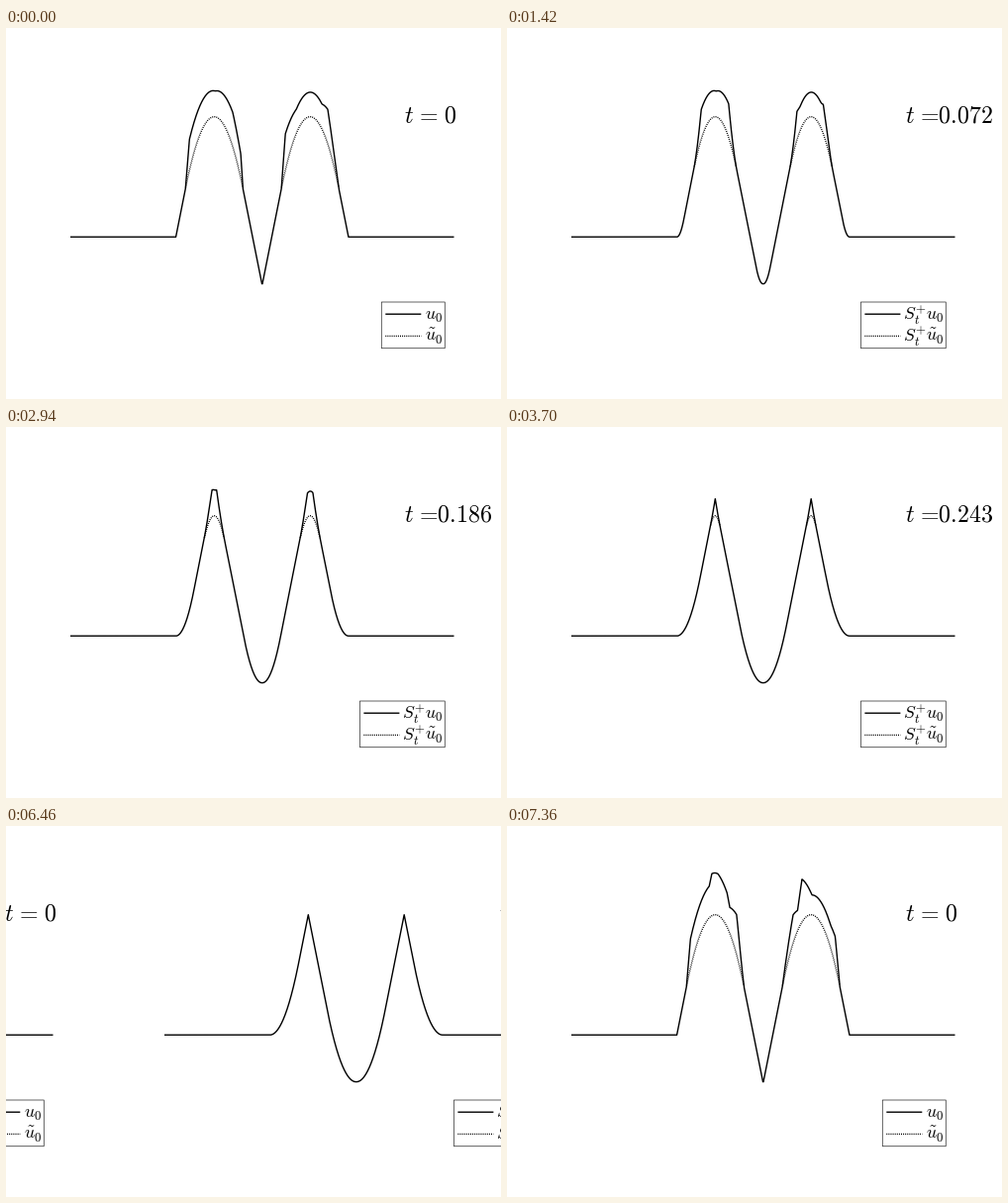
A matplotlib script for the animation above (8000 ms loop, 500 by 375 pixels).

```python
import numpy as np
import matplotlib.pyplot as plt
from matplotlib.animation import FuncAnimation
from matplotlib.patches import Rectangle
from matplotlib.transforms import Affine2D

W, H, DPI = 500, 375, 100
PT = 72 / DPI                       # points per pixel
TICK, LOOP = 20, 8000
EVOLVE, SLIDE, ARRIVE = 500, 6460, 7360
STEPS, DT = 100, 0.003
HORIZON = STEPS * DT

X0, X_SCALE = 258.75, 96.875
Y0, Y_SCALE = 211.2, 486

plt.rcParams["mathtext.fontset"] = "cm"

x = np.linspace(-1, 1, 801)
PLOT_X = X0 + X_SCALE * np.concatenate([[-2], x, [2]])
COST = (x[:, None] - x[None, :]) ** 2 / 2


def smooth_profile():
    """Unit-slope flanks joined by parabolic caps centred at +-0.5."""
    a = np.abs(x)
    cap = 0.25 - (a - 0.5) ** 2 / (2 * HORIZON)
    u = np.where(np.abs(a - 0.5) < HORIZON, cap,
                 np.where(a < 0.5, a - 0.1, np.maximum(0.9 - a, 0)))
    return np.maximum(u, -0.0975)


def lift(center, *knots):
    """Broken line added to a cap; knots are (offset, height) in pixels."""
    edge = HORIZON * X_SCALE
    dx, dy = np.array([(-edge, 0), *knots, (edge, 0)]).T
    return np.interp((x - center) * X_SCALE, dx, dy) / Y_SCALE


def hopf_lax(u, t):
    return u if t == 0 else (COST / t + u).min(axis=1)


def evolve(u, steps):
    """Screen heights of the solution at each time step."""
    states = (hopf_lax(u, k * DT) for k in range(steps + 1))
    return [Y0 - Y_SCALE * np.pad(state, 1) for state in states]


smooth = smooth_profile()
rounded = (smooth
           + lift(-0.5, (-25, 31.2), (1, 26), (18.7, 34.6), (26.8, 24.5))
           + lift(0.5, (-25, 36.7), (-14, 24.3), (12, 25.2), (17.8, 34.8),
                  (23.8, 14)))
jagged = (smooth
          + lift(-0.5, (-25, 29.5), (-6, 32), (-3.4, 42.5), (2.7, 42),
                 (12, 34.4), (14.6, 25.8), (21.6, 40.4), (26.7, 10))
          + lift(0.5, (-18.2, 28.5), (-13.7, 20.5), (-9.2, 43.2), (0.8, 20),
                 (19.8, 23), (24.3, 29)))

smooth_states = evolve(smooth, STEPS)
rounded_states = evolve(rounded, STEPS)
jagged_states = evolve(jagged, 0)

fig = plt.figure(figsize=(W / DPI, H / DPI), dpi=DPI, facecolor="white")
ax = fig.add_axes([0, 0, 1, 1])
ax.set(xlim=(0, W), ylim=(H, 0))
ax.set_axis_off()

SOLID = dict(color="black", lw=1.4 * PT, ls="-", solid_joinstyle="round",
             solid_capstyle="butt", snap=False)
DOTTED = dict(color="black", lw=1.4 * PT, ls=(0, (0.7, 0.8)),
              dash_capstyle="butt", snap=False)
FONT, SMALL = 17.8, 12.8


class Panel:
    """One plot with its time label and legend, movable sideways."""

    def __init__(self, states):
        self.states = states
        self.shift = Affine2D()
        self.place = dict(transform=self.shift + ax.transData)
        self.dotted = self.line(DOTTED)
        self.solid = self.line(SOLID)
        self.time = self.text(402.5, 95, "", 24)
        self.box = ax.add_patch(Rectangle(
            (0, 277), 1, 46.7, fc="white", ec="#262626", lw=0.7 * PT,
            snap=False, **self.place))
        self.keys = [self.line(SOLID), self.line(DOTTED)]
        self.names, self.operators = [], []
        for base, symbol in ((294.4, "u"), (316.2, r"\tilde{u}")):
            self.names += [self.text(422.7, base, symbol, FONT),
                           self.text(432.7, base + 2.7, "0", SMALL)]
            self.operators += [self.text(400, base, "S", FONT),
                               self.text(411, base + 4.4, "t", SMALL),
                               self.text(412, base - 6.5, "+", SMALL)]
        self.artists = [self.dotted, self.solid, self.time, self.box,
                        *self.keys, *self.names, *self.operators]

    def line(self, style):
        return ax.plot([], [], **style, **self.place)[0]

    def text(self, px, py, symbol, size):
        # Braces keep a lone "+" free of operator spacing.
        content = f"${{{symbol}}}$" if symbol else ""
        return ax.text(px, py, content, fontsize=size * PT, va="baseline",
                       ha="left", **self.place)

    def hide(self):
        for artist in self.artists:
            artist.set_visible(False)

    def show(self, step, dx=0):
        for artist in self.artists:
            artist.set_visible(True)
        for glyph in self.operators:
            glyph.set_visible(step > 0)
        self.shift.clear().translate(dx, 0)

        solid, dotted = self.states[step], smooth_states[step]
        self.solid.set_data(PLOT_X, solid)
        self.dotted.set_data(
            PLOT_X, np.where(dotted - solid > 0.3, dotted, np.nan))

        if step:
            left, gap, value = 357.4, -0.2, f"{step * DT:.4g}"
        else:
            left, gap, value = 379.3, 0.117, "0"
        self.time.set_text(
            rf"$t\hspace{{0.117}}=\hspace{{{gap}}}{value}$")
        self.box.set_x(left)
        self.box.set_width(443.3 - left)
        for key, y in zip(self.keys, (289.2, 311.4)):
            key.set_data([left + 4, left + 40], [y, y])


current = Panel(rounded_states)
incoming = Panel(jagged_states)


def update(frame):
    ms = frame * TICK
    current.hide()
    incoming.hide()
    if ms < EVOLVE:
        current.show(0)
    elif ms < SLIDE:
        current.show(min((ms - EVOLVE) // 40 + 1, STEPS))
    elif ms < ARRIVE:
        dx = 95 + 50 * ((ms - SLIDE) // 100)
        current.show(STEPS, dx)
        incoming.show(0, dx - W)
    else:
        incoming.show(0)
    return current.artists + incoming.artists


anim = FuncAnimation(fig, update, frames=LOOP // TICK, interval=TICK,
                     repeat=True, repeat_delay=0, blit=False)
plt.show()
```
